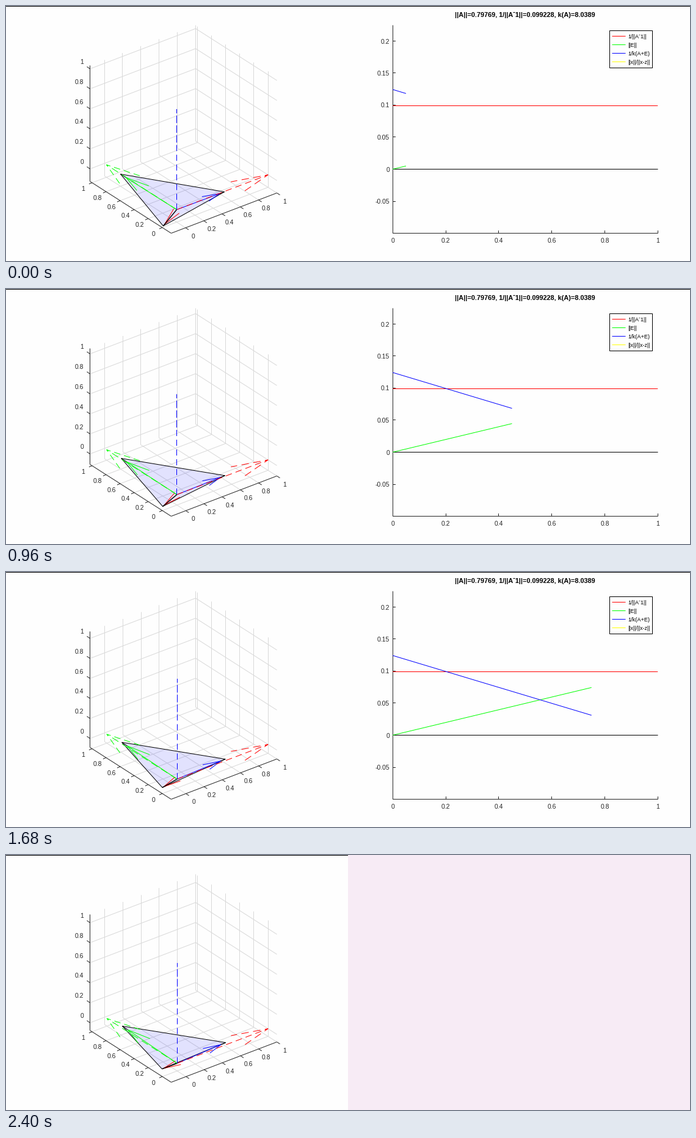
A matplotlib script that plays this animation: 1120 px wide and 418 px high, repeating every 2.52 s.

```python
import numpy as np
import matplotlib.pyplot as plt
from matplotlib.animation import FuncAnimation
from matplotlib.patches import Polygon, Rectangle

W, H, DPI = 1120, 418, 100
FRAMES, INTERVAL = 21, 120
PX = 72 / DPI
DARK, GRID = "#262626", "#d9d9d9"
RED, GREEN, BLUE, YELLOW = "#ff0000", "#00ff00", "#0000ff", "#ffff00"
TICKS = np.arange(6) / 5
NORM_INV, COND = 0.099228, 8.0389

plt.rcParams["font.family"] = "Liberation Sans"
plt.rcParams["path.snap"] = False
fig = plt.figure(figsize=(W / DPI, H / DPI), dpi=DPI, facecolor="#fefefe")
ax = fig.add_axes([0, 0, 1, 1])
# Whole numbers are pixel centres.
ax.set_xlim(-0.5, W - 0.5)
ax.set_ylim(H - 0.5, -0.5)
ax.axis("off")

moving = []


def line(pts, color, lw=1.0, z=3, dashed=False):
    pts = np.array(pts, float)
    for k in (0, 1):
        # Upright and level lines sit on one pixel row.
        if np.ptp(pts[:, k]) < 1e-6:
            pts[:, k] = np.round(pts[:, k])
    art, = ax.plot(pts[:, 0], pts[:, 1], color=color, lw=lw * PX, zorder=z,
                   solid_capstyle="butt", dash_capstyle="butt")
    if dashed:
        # The dash length counts pixels along the longer axis.
        d = np.abs(pts[1] - pts[0])
        k = np.hypot(*d) / d.max()
        art.set_dashes((10 * k, 6 * k))
    return art


def label(x, y, text, size=10.4, ha="center", z=5, **kw):
    return ax.text(x, y, text, fontsize=size * PX, color=kw.pop("color", DARK),
                   ha=ha, va="center_baseline", zorder=z, **kw)


def num(v):
    return f"{v:g}"


# ---------- right panel ----------

def chart(u, v):
    return np.column_stack(np.broadcast_arrays(632.7 + 434 * np.asarray(u),
                                               267 - 1050 * np.asarray(v)))


def build_chart():
    line([(633, 31), (633, 372)], DARK)
    line([(633, 372), (1067, 372)], DARK)
    for v in TICKS:
        x = 632.7 + 434 * v
        line([(x, 372), (x, 367.5)], DARK)
        label(x, 384, num(v))
    for v in np.arange(-1, 5) * 0.05:
        y = 267 - 1050 * v
        line([(633, y), (637.5, y)], DARK)
        label(627.5, y, num(round(v, 2)), ha="right")
    line([(633, 267), (1067, 267)], "black")
    line(chart([0, 1], NORM_INV), RED)
    label(849.5, 14, "||A||=0.79769, 1/||A\u02c91||=0.099228, k(A)=8.0389",
          10.85, weight="bold", color="black")

    ax.add_patch(Rectangle((988, 40), 70, 61, fc="#fefefe", ec="black",
                           lw=PX, zorder=8))
    rows = [("1/||A\u02c91||", RED, 9), ("||E||", GREEN, 8.8),
            ("1/k(A+E)", BLUE, 9.1), ("||x||/||x-z||", YELLOW, 8.6)]
    for i, (text, color, size) in enumerate(rows):
        y = 48.7 + 14.2 * i
        line([(992, y), (1014, y)], color, z=9)
        label(1018, y, text, size, ha="left", z=9, color="black")


build_chart()
line([(-1, 0), (W, 0)], "black", z=2)
norm_e = line([(0, 0)], GREEN)
inv_cond = line([(0, 0)], BLUE)
ratio = line([(0, 0)], YELLOW)
ratio.set_clip_path(Rectangle((633, 31), 434, 341, transform=ax.transData))
cover = ax.add_patch(Rectangle((559.5, -1), 561, H + 2, fc="#f7ebf5",
                               ec="none", zorder=50, visible=False))


# ---------- left panel ----------

FRONT = np.array([270, 372.0])
EX, EY, EZ = np.array([173, -66.0]), np.array([-133, -85.0]), np.array([0, -190.0])


def box(a, b, c):
    return FRONT + a * EX + b * EY + c * EZ


class View:
    """Orthographic box whose lower x and z limits drift with t."""

    def __init__(self, t):
        self.x0 = -0.157 - 0.006 * t
        self.z0 = (20.9 - 8.4 * t) / 190

    def nx(self, x):
        return (x - self.x0) / (1 - self.x0)

    def ny(self, y):
        return (y + 0.126) / 1.156

    def nz(self, z):
        return z * 164 / 190 + self.z0

    def at(self, x, y, z):
        return box(self.nx(x), self.ny(y), self.nz(z))


def draw_axes(view):
    out = []
    for v in TICKS:
        a, b, c = view.nx(v), view.ny(v), view.nz(v)
        for path in ([box(a, 0, 0), box(a, 1, 0)], [box(a, 1, 0), box(a, 1, 1)],
                     [box(0, b, 0), box(1, b, 0)], [box(1, b, 0), box(1, b, 1)],
                     [box(0, 1, c), box(1, 1, c)], [box(1, 1, c), box(1, 0, c)]):
            out.append(line(path, GRID, z=1))
        marks = ((box(a, 0, 0), (5, 3.2), (12.5, 13)),
                 (box(0, b, 0), (-5, 2), (-14.5, 9.5)),
                 (box(0, 1, c), (-5, -3.5), (-11, -12)))
        for i, (p, tick, shift) in enumerate(marks):
            out.append(line([p, p + tick], DARK))
            x, y = p + shift
            if i == 2:
                out.append(label(126.5, y, num(v), ha="right"))
            else:
                out.append(label(x, y, num(v)))
    for p, q in ((box(0, 1, 1), box(0, 1, 0)), (box(0, 1, 0), box(0, 0, 0)),
                 (box(0, 0, 0), box(1, 0, 0))):
        out.append(line([p, q], DARK))
    return out


def arrow(origin, vec, wing, color, z, dashed=False):
    tip, neck = origin + vec, origin + 0.67 * vec
    return [line([origin, tip], color, z=z, dashed=dashed),
            line([neck + wing, tip, neck - wing], color, z=z, dashed=dashed)]


def draw_scene(t):
    view = View(t)
    out = draw_axes(view)
    o = view.at(0, 0, 0)
    ux, uy, uz = (view.at(*e) - o for e in np.eye(3))

    def mix(p, q):
        return np.array(p, float) + (np.array(q, float) - p) * t

    pg = mix((186.9, 274.8), (190, 280))
    pb = mix((357, 304), (359.2, 307))
    pr = mix((257, 360.6), (255, 350.2))
    out.append(ax.add_patch(Polygon([pg, pb, pr], fc=(0, 0, 1, 0.11), ec="none",
                                    zorder=2)))
    out.append(line([pg, pb, pr, pg], "black"))

    # Black vectors reach the corners, coloured arrows stop at 90 %.
    for p in (pg, pb):
        out.append(line([o + 0.9 * (p - o), p], "black"))
    out += arrow(o, 0.9 * (pg - o), 0.065 * ux, GREEN, 4)
    out += arrow(o, 0.9 * (pb - o), 0.05 * uy, BLUE, 4)
    tip = o + 0.9 * (pr - o)
    out.append(line([o + mix((-5, -1), (-3, -4)), tip, o + mix((4, 6), (6, 2))],
                    RED, z=4))
    out.append(line([o, pr], "black", lw=1.4, z=4))

    out += arrow(o, ux, -0.1 * uy, RED, 4.5, True)
    out += arrow(o, uy, 0.11 * ux, GREEN, 4.5, True)
    out += arrow(o, uz, 0 * uz, BLUE, 4.5, True)
    return out


def draw(i):
    while moving:
        moving.pop().remove()
    steps = min(i + 1, 20)
    u = np.arange(steps + 1) / 20
    s = 1 - u
    for art, v in ((norm_e, NORM_INV * u), (inv_cond, s / COND),
                   (ratio, 1.017 * s + 1.27 * s ** 2)):
        art.set_data(*chart(u, v).T)
    moving.extend(draw_scene(steps / 20))
    cover.set_visible(i == FRAMES - 1)
    return []


anim = FuncAnimation(fig, draw, frames=FRAMES, interval=INTERVAL,
                     init_func=lambda: draw(0), repeat=True, repeat_delay=0)
plt.show()
```
